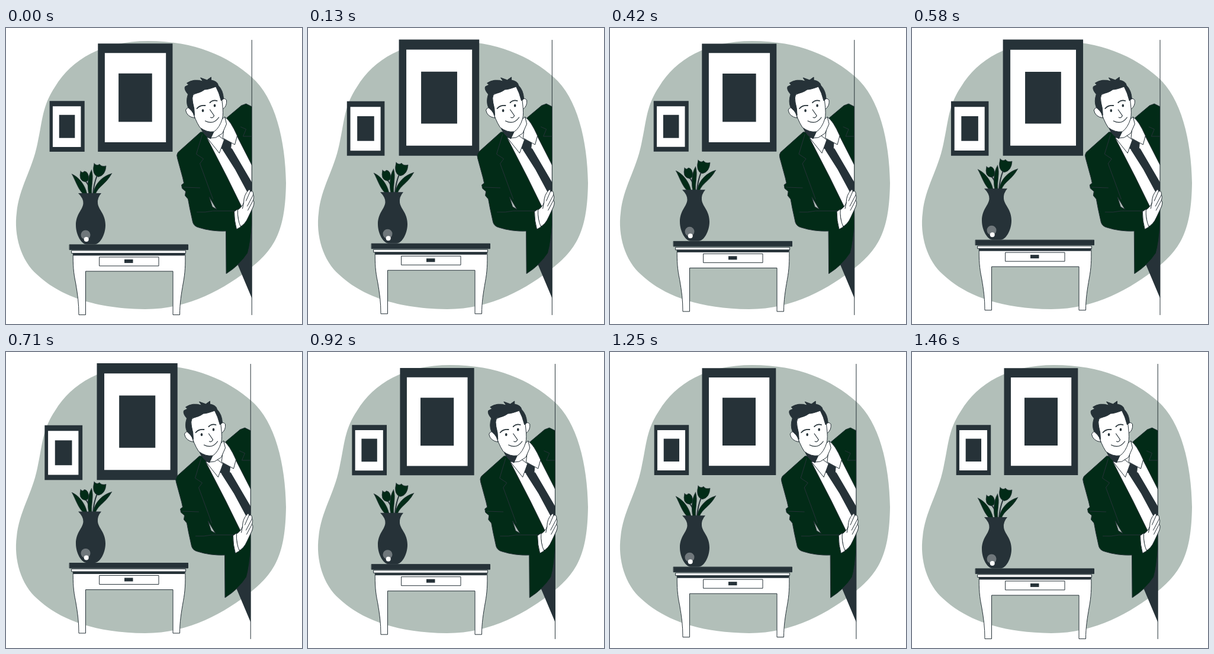
An HTML page that plays this animation: 500 by 500 pixels, repeating every 1.5 s.

```html
<!DOCTYPE html>
<html lang="en">
<head>
<meta charset="utf-8">
<style>
  html, body { margin: 0; width: 100%; height: 100%; overflow: hidden; background: #fff; }
  svg { display: block; width: 100vw; height: 100vh; }
  .wall { fill: #b2bfb9; }
  .dark { fill: #263238; }
  .white { fill: #fff; }
  .green { fill: #022b17; }
  .line { stroke: #263238; stroke-width: 1; stroke-linejoin: round; stroke-linecap: round; }
  .none { fill: none; }
</style>
</head>
<body>
<svg viewBox="0 0 500 500">
  <defs>
    <clipPath id="doorEdge"><path d="M250 0H415.7V500H250Z"/></clipPath>
  </defs>

  <path class="wall" d="M240 22C320 22 375 48 415 83C455 118 472 190 473 262C472 340 455 372 415 404C370 440 310 475 235 475C140 474 85 447 53 417C25 393 13 350 18 312C22 270 44 240 53 196C62 155 61 132 83 99C111 53 163 22 240 22Z"/>

  <g id="pictures">
    <path class="dark" d="M155.5 27.3H280.3V208H155.5ZM74.7 123.3H133.2V208H74.7Z"/>
    <path class="white" d="M167 43H269.2V192.3H167ZM80 132H127V200H80Z"/>
    <path class="dark" d="M190 77.3H246V158H190ZM90.7 146.5H117V185H90.7Z"/>
  </g>

  <g id="table">
    <g class="line">
      <path class="white" d="M113.3 380H302.7C303.300 400 302.500 414 299.500 430C296 450 293.500 465 293.500 484.500H282V411H134.500V484.500H123C123 465 121 450 117.500 430C114 414 113 400 113.300 380Z"/>
      <path class="white" d="M158 387H258V402H158Z"/>
      <path class="dark" d="M114 380.500H301.500V384H114Z"/>
      <path class="white" d="M111 376H303.500V380.500H111Z"/>
      <path class="dark" d="M107.500 366H307.500V374.500H107.500Z"/>
    </g>
    <path class="dark" d="M200 391H214.500V397H200Z"/>
    <g class="green line" style="stroke-width:.8">
      <path class="none" d="M134 258Q142 268 144 281M154 249Q148 264 147 281" style="stroke-width:2"/>
      <path d="M111.500 247C122 251 134 265 137 281L131 281C122 273 118 259 111.500 247Z"/>
      <path d="M178.500 246C164 250 150 262 147 281H151C156 267 168 265 178.500 246Z"/>
      <path d="M144.500 240C138 251 137 267 140 281H145C143 268 149 253 144.500 240Z"/>
      <path d="M126 242Q130 246 132 242Q136 242 138 246Q143 258 134 260Q122 258 126 242Z"/>
      <path d="M149 229Q154 234 158 230Q161 235 169 233Q168 249 156 251.500Q144 248 149 229Z"/>
    </g>
    <path class="dark" d="M122 279H161Q154 287 155 296C156 307 168 314 168 333C168 350 158 365.500 150 365.500H136C128 365.500 118 350 118 333C118 314 130 307 130.500 296Q131 288 122 279Z"/>
    <circle cx="134.500" cy="349.500" r="8" fill="#6f777b"/>
    <circle class="white" cx="135.700" cy="357" r="4"/>
  </g>

  <g id="visitor">
    <g clip-path="url(#doorEdge)">
      <path class="dark" d="M392 400L416 457V330L404 385Z"/>
      <g class="line">
        <path class="green" d="M329 176L291 210Q288 214 290 220L299 253L301 262L297 265L298 271L304 276L303 283L308 289L311 305L316 328Q318 335 326 337Q348 344 372 343L372.500 415Q396 400 409 380Q414 362 416 330V133L406 128L398 131L373 152L350 176Z"/>
        <path class="wall" d="M344 286L349 302L356 306Z"/>
        <path class="white" d="M340 186L374 252L400 305L416 300V232L391 183L378 158Z"/>
        <path class="dark" d="M367 206L388 239L409 278L416 285V262L382 204Z"/>
        <path class="dark" d="M369 188L381 194L380 205L372 208L364 203Z"/>
        <path class="white" d="M341 186L352 176L369 189L361 211Z"/>
        <path class="white" d="M371 151Q380 157 391 182L387 197L367 186Z"/>
        <path class="white" d="M350 168L370 150L373 162L366 178L355 185L346 186Z"/>
        <path class="none" d="M332 180L322 213L334 221L328 229L350 289M397 167L406 171L401 183L416 183M301 269L328 270M323 311Q337 312 350 309H388"/>
      </g>
    </g>

    <g class="line">
      <path class="dark" d="M328 166L353 172L346 187Q335 183 328 166Z"/>
      <path class="white" d="M364 123Q369 116 373 122Q374 132 367 137Z"/>
      <path class="white" d="M314 136Q306 132 304 139Q306 150 319 152Z"/>
      <path class="white" d="M314 114Q335 103 356 96Q365 111 366 128Q368 145 366 153Q361 169 352 175Q340 177 328 168Q319 154 315 137Z"/>
      <path class="dark" d="M319 147Q314 139 308 134Q304 124 308 112Q301 104 303 99L309 96L306 93Q318 85 333 90L329 84L340 88L347 83V88Q358 90 359 97Q367 105 368 119L364 123L360 110L355 99Q342 104 336 104Q328 110 317 111Q314 118 316 126Q319 136 319 147Z"/>
      <path class="none" d="M345 138L352 148Q350 153 346 151M337 157Q351 164 360 151" style="stroke-width:1.200"/>
      <path class="none" d="M323 136Q328 130 337 131M345 126Q350 121 357 123" style="stroke-width:1.800"/>
    </g>
    <ellipse class="dark" cx="333" cy="139.500" rx="1.800" ry="2.500"/>
    <ellipse class="dark" cx="353" cy="131" rx="1.800" ry="2.500"/>

    <path class="line" d="M415.700 20.500V484.500"/>
    <g class="line white">
      <path d="M391 308Q400 302 402 295Q402 282 410 274Q413 271 413 276Q419 274 418 282Q420 284 418 291Q421 294 418 302L410 319Q404 333 395 336Z"/>
      <path d="M386 310L392 306Q391 323 397 336L390 340Q386 326 386 310Z"/>
      <path class="none" d="M413 276L406 292M418 282L408 301M418 291L409 308M402 295L400 305"/>
    </g>
  </g>
</svg>

<script>
const LOOP = 1500, FRAMES = 36;
const pictures = document.getElementById('pictures');
const table = document.getElementById('table');
const visitor = document.getElementById('visitor');

const ease = x => x * x * (3 - 2 * x);

// Two beats followed by a rest
const beatTimes = [0, 220, 405, 700, 995];
function beat(ms) {
  const i = beatTimes.findIndex(end => ms < end);
  if (i < 0) return 0;
  const x = ease((ms - beatTimes[i - 1]) / (beatTimes[i] - beatTimes[i - 1]));
  return i % 2 ? x : 1 - x;
}

// Zigzag between -1 and 1 that starts and ends at rest
function zigzag(p) {
  const edge = Math.min(p, 1 - p);
  return edge < 0.1 ? -10 * edge : 4 * Math.abs((p * 5) % 1 - 0.5) - 1;
}

function draw(now) {
  const step = Math.floor(((now % LOOP) + 5) / LOOP * FRAMES) % FRAMES;
  const p = (step + 0.5) / FRAMES;
  const scale = 1 + 0.1 * beat((p * LOOP + 24) % LOOP);
  const lift = 10 * (1 - Math.abs(1 - 2 * p));
  const shake = 3.5 * zigzag(p);

  pictures.setAttribute('transform', `translate(177.5 117.5) scale(${scale}) translate(-177.5 -117.5)`);
  table.setAttribute('transform', `translate(0 ${0.2 - lift})`);
  visitor.setAttribute('transform', `translate(${shake} 0)`);
}

let start;
function tick(now) {
  start ??= now;
  draw(now - start);
  requestAnimationFrame(tick);
}
draw(0);
requestAnimationFrame(tick);
</script>
</body>
</html>
```
